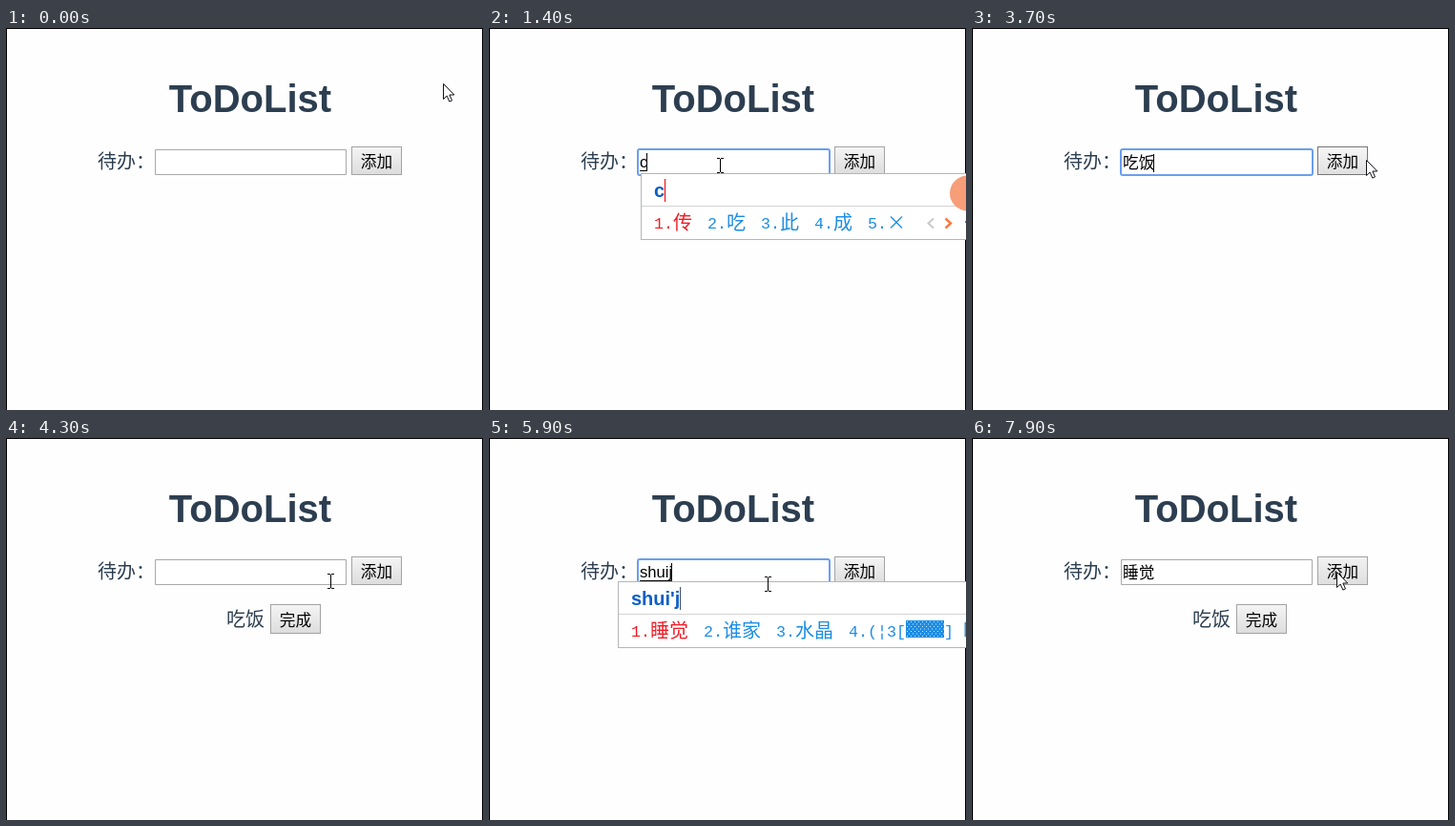
Write an HTML page with a canvas that moves like this. It is 500 by 400 pixels and loops after 8 s.

```html
<!DOCTYPE html>
<html lang="zh-CN">
<head>
<meta charset="utf-8">
<title>ToDoList</title>
<style>
  html, body { margin: 0; width: 100%; height: 100%; overflow: hidden; background: #fefefe; }
  canvas { display: block; }
</style>
</head>
<body>
<canvas id="stage" width="500" height="400"></canvas>
<script>
const ctx = document.getElementById('stage').getContext('2d');
const LOOP = 8000, STEP = 100;
const SANS = '"Liberation Sans", "Noto Sans CJK SC", "Noto Sans CJK", sans-serif';
const MONO = '"Liberation Mono", "DejaVu Sans", monospace';
const CJK = '"Noto Sans CJK SC", "Noto Sans CJK", sans-serif';
const INK = '#2c3e50', RED = '#f01c26', BLUE = '#1c8de4', DEEP = '#0a5fc4';

// Pointer tip, held from each time until the next.
const pointer = [
  [0, 458, 58], [100, 448, 82], [200, 405, 130], [300, 330, 159], [400, 250, 148], [500, 221, 141],
  [700, 232, 143], [800, 242, 144],
  [3300, 258, 143], [3400, 300, 141], [3500, 375, 136], [3600, 435, 132], [3700, 413, 138],
  [3800, 404, 140], [3900, 399, 141], [4200, 385, 143], [4300, 340, 150], [4400, 300, 152],
  [4500, 296, 153], [4600, 292, 153],
  [7300, 300, 153], [7400, 325, 160], [7500, 351, 167], [7600, 372, 155], [7700, 380, 145], [7800, 382, 140]
];

// Field content; every entry restarts the caret blink.
const typing = [
  [0, ''], [500, ''], [1400, 'c'], [1800, 'cf'], [2500, '吃饭'], [4100, ''], [4400, ''],
  [5200, 's'], [5400, 'sh'], [5500, 'shu'], [5700, 'shui'], [5900, 'shuij'], [6600, '睡觉']
];

const suggestions = {
  c: { words: ['传', '吃', '此', '成', '×'] },
  cf: { spelling: "c'f", words: ['吃饭', '重复', '存放', 'וו(❛ᴗ❛)', '此'], emojiAt: 1900, hintAt: 2200, hintTime: 300 },
  s: { words: ['是', '宋', '时', '上', '↑'] },
  sh: { words: ['是', '上', '时', '说', '山'] },
  shu: { words: ['书', '数', '树', '属', '输'] },
  shui: { words: ['水', '谁', '睡', '税', '说'] },
  shuij: { spelling: "shui'j", words: ['睡觉', '谁家', '水晶', '(¦3[▓▓] 晚安'], hintAt: 6200, hintTime: 400, dx: -24, dy: -2, caret: '#45506a' }
};

const between = (t, a, b) => t >= a && t < b;
const latest = (track, t) => track.filter(key => key[0] <= t).pop();

function text(str, x, y, font, color, align = 'left') {
  ctx.font = font;
  ctx.fillStyle = color;
  ctx.textAlign = align;
  ctx.fillText(str, x, y);
}

function rect(x, y, w, h, color) {
  ctx.fillStyle = color;
  ctx.fillRect(x, y, w, h);
}

function line(points, color, width = 1) {
  ctx.beginPath();
  points.forEach(([x, y]) => ctx.lineTo(x, y));
  ctx.strokeStyle = color;
  ctx.lineWidth = width;
  ctx.stroke();
}

function button(x, y, w, h, label, state) {
  const [top, bottom, edge] = {
    normal: ['#f5f5f5', '#dcdcdc', '#a3a3a3'],
    hover: ['#f7f7f7', '#dfdfdf', '#767676'],
    pressed: ['#f2f2f2', '#dedede', '#a3a3a3']
  }[state];
  const shade = ctx.createLinearGradient(0, y, 0, y + h);
  shade.addColorStop(0, top);
  shade.addColorStop(1, bottom);
  rect(x, y, w, h, shade);
  ctx.strokeStyle = edge;
  ctx.lineWidth = 1;
  ctx.strokeRect(x + .5, y + .5, w - 1, h - 1);
  text(label, x + w / 2, y + h / 2 + 7, '16.67px ' + CJK, '#000', 'center');
}

function field(value, focused, caretOn) {
  rect(156, 127, 201, 27, '#fff');
  ctx.strokeStyle = focused ? '#6a9fee' : '#a9a9a9';
  ctx.lineWidth = focused ? 2 : 1;
  ctx.beginPath();
  if (focused) ctx.roundRect(156, 127, 201, 27, 2);
  else ctx.rect(156.5, 127.5, 200, 26);
  ctx.stroke();
  const latin = /^[a-z]/.test(value);
  text(value, 158, latin ? 146 : 147, '16.67px ' + SANS, '#000');
  const width = ctx.measureText(value).width;
  if (latin) rect(158, 149, Math.round(width), 1, '#000');
  if (focused && caretOn) rect(Math.max(158, Math.floor(157.6 + width)), value && !latin ? 132 : 131, 1, 19, '#000');
}

// Fixed-pitch text: half-width Latin, full-width Chinese. Returns the end x.
function pitched(str, x, y, size, color) {
  const narrow = { 'ו': .4, '❛': .3, 'ᴗ': .3 };
  for (const ch of str) {
    const half = /[ -~¦]/.test(ch);
    const advance = size * (narrow[ch] || (half ? .5 : 1));
    if (ch === '▓') {
      rect(x, y - 18, advance, 18, color);
      for (let i = 0; i < 35; i++) rect(x + 1 + i % 5 * 4 + (i / 5 & 1) * 2, y - 17 + Math.floor(i / 5) * 2.5, 1, 1, '#d4eafa');
    } else if (narrow[ch]) {
      text(ch, x + advance / 2, y - 1, size * .75 + 'px "DejaVu Sans", sans-serif', color, 'center');
    } else {
      const font = half ? size / 1.2 + 'px ' + MONO : '300 ' + size + 'px ' + CJK;
      text(ch, x, half ? y - 1.5 * size / 20 : y, font, color);
    }
    x += advance;
  }
  return x;
}

function hint(alpha) {
  ctx.globalAlpha = alpha;
  ctx.strokeStyle = '#f0886a';
  ctx.lineWidth = 1.3;
  ctx.beginPath();
  ctx.arc(269, 170, 7.8, 0, Math.PI * 2);
  ctx.stroke();
  rect(268, 165, 2, 2, '#f0886a');
  rect(268, 169, 2, 6, '#f0886a');
  pitched('6.更多颜文字', 284, 175.5, 15, '#1768b4');
  ctx.globalAlpha = 1;
}

function imePanel(value, t) {
  const info = suggestions[value];
  const spelling = info.spelling || value;
  ctx.save();
  ctx.translate(info.dx || 0, info.dy || 0);
  rect(159, 152, 400, 70, '#b4b6b9');
  rect(160, 153, 400, 68, '#fff');
  rect(160, 186, 400, 1, '#d4d4d4');
  text(spelling, 173, 177, 'bold 20px ' + SANS, DEEP);
  rect(Math.floor(173 + ctx.measureText(spelling).width), 158, 1, 24, info.caret || '#f00000');

  let x = 173;
  info.words.forEach((word, i) => {
    if (i >= 3 && t < (info.emojiAt || 0)) return;
    x = pitched(i + 1 + '.' + word, x, 211, 20, i ? BLUE : RED) + 16;
  });

  if (info.spelling) {
    const shown = Math.min(1, (t - info.hintAt + STEP) / info.hintTime);
    if (shown > 0) hint(shown);
  } else {
    line([[466, 199.5], [460.5, 204.5], [466, 209.5]], '#c9c9c9', 2);
    line([[478.5, 199.5], [484, 204.5], [478.5, 209.5]], '#f57a45', 2.4);
    rect(499, 202, 1, 2, BLUE);
    ctx.fillStyle = '#f79d78';
    ctx.beginPath();
    ctx.arc(501.5, 173, 18.5, 0, Math.PI * 2);
    ctx.fill();
  }
  ctx.restore();
}

function arrow(x, y) {
  const shape = [[0, 0], [0, 16], [3.7, 12.6], [6.3, 18.6], [9, 17.4], [6.4, 11.5], [11.3, 11.5]];
  ctx.beginPath();
  shape.forEach(([dx, dy]) => ctx.lineTo(x + dx + .5, y + dy + .5));
  ctx.closePath();
  ctx.fillStyle = '#fff';
  ctx.fill();
  ctx.strokeStyle = '#101018';
  ctx.lineWidth = 1;
  ctx.stroke();
}

function iBeam(x, y) {
  rect(x, y - 7, 1, 14, '#000');
  for (const edge of [y - 8, y + 7]) {
    rect(x - 3, edge, 3, 1, '#000');
    rect(x + 1, edge, 3, 1, '#000');
  }
}

function draw(t) {
  const [, x, y] = latest(pointer, t);
  const [since, value] = latest(typing, t);
  const focused = between(t, 500, 4000) || between(t, 4400, 7900);
  const caretOn = Math.floor((t - since) / 500) % 2 === 0;
  const pressed = t === 4000 || t === 7900;
  const onButton = between(x, 362, 415) && between(y, 124, 154);
  const inField = between(x, 156, 357) && between(y, 127, 154);

  rect(0, 0, 500, 400, '#fefefe');
  rect(0, 0, 500, 1, '#000');
  rect(0, 0, 1, 400, '#000');
  rect(499, 0, 1, 400, '#000');

  text('ToDoList', 256, 88, 'bold 40px ' + SANS, INK, 'center');
  text('待办：', 96, 147, '300 20px ' + CJK, INK);
  field(value, focused, caretOn);
  button(362, 124, 53, 30, '添加', pressed ? 'pressed' : onButton ? 'hover' : 'normal');
  if (t >= 4100) {
    text('吃饭', 231, 197, '300 20px ' + CJK, INK);
    button(277, 174, 53, 31, '完成', 'normal');
  }
  if (suggestions[value]) imePanel(value, t);
  (inField ? iBeam : arrow)(x, y);
}

const start = performance.now();
function tick() {
  const elapsed = (performance.now() - start) % LOOP;
  draw(Math.floor(elapsed / STEP) * STEP);
  requestAnimationFrame(tick);
}
tick();
</script>
</body>
</html>
```
